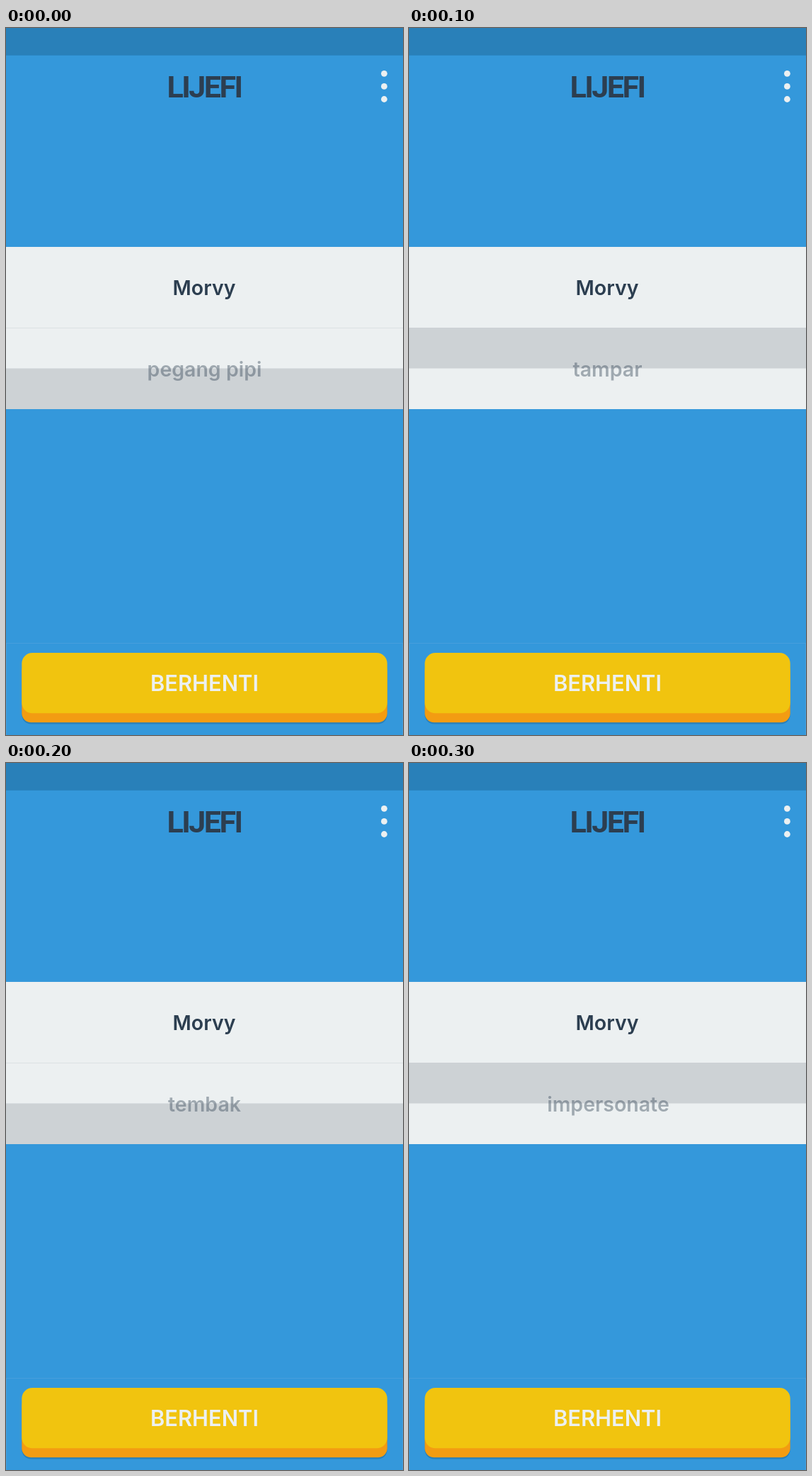
An HTML page for the animation above (0.4 s loop, 561 px wide and 998 px high).

```html
<!DOCTYPE html>
<html lang="id">
<head>
<meta charset="utf-8">
<title>Pemilih acak</title>
<style>
  html, body { margin: 0; width: 100%; height: 100%; overflow: hidden; background: #3498db; }
  svg { display: block; width: 561px; height: 998px; }
  text { font: 600 28.5px Inter, Lato, sans-serif; text-anchor: middle; fill: #2c3e50; }
  .title { font: 700 43px Roboto, sans-serif; letter-spacing: -2.5px; }
  .label { font-size: 30.8px; fill: #ecf0f1; }
  .light { fill: #ecf0f1; }

  .shade { fill: #cdd2d5; animation: hop 200ms step-end infinite; }
  .word { fill-opacity: .4; visibility: hidden; animation: show 400ms step-end infinite; }
  .word:nth-child(2) { animation-delay: -300ms; }
  .word:nth-child(3) { animation-delay: -200ms; }
  .word:nth-child(4) { animation-delay: -100ms; }

  @keyframes hop {
    0% { y: 480.5px; }
    50%, 100% { y: 423px; }
  }
  @keyframes show {
    0% { visibility: visible; }
    25%, 100% { visibility: hidden; }
  }
</style>
</head>
<body>
<svg viewBox="0 0 561 998">
  <rect width="561" height="998" fill="#3498db"/>
  <rect width="561" height="38.7" fill="#2980b9"/>

  <text class="title" x="280" y="97.5">LIJEFI</text>
  <g class="light">
    <circle cx="534.4" cy="64.3" r="4.4"/>
    <circle cx="534.4" cy="82.4" r="4.4"/>
    <circle cx="534.4" cy="100.5" r="4.4"/>
  </g>

  <rect class="light" y="309" width="561" height="229"/>
  <rect y="423" width="561" height="1" fill="#dce1e3"/>
  <rect class="shade" y="423" width="561" height="57.5"/>
  <text x="280" y="377">Morvy</text>
  <g>
    <text class="word" x="280.5" y="491.5">pegang pipi</text>
    <text class="word" x="280.5" y="491.5">tampar</text>
    <text class="word" x="280.5" y="491.5">tembak</text>
    <text class="word" x="281.5" y="491.5">impersonate</text>
  </g>

  <rect x=".5" y="868.5" width="560" height="140" fill="none" stroke="#479fdc"/>
  <rect x="22.3" y="897" width="516.4" height="85.5" rx="13" fill="#2980b9"/>
  <rect x="22.3" y="895" width="516.4" height="85.3" rx="13" fill="#f39c12"/>
  <rect x="22.3" y="882" width="516.4" height="85.3" rx="15" fill="#f1c40f"/>
  <text class="label" x="280.5" y="936">BERHENTI</text>
</svg>
</body>
</html>
```
